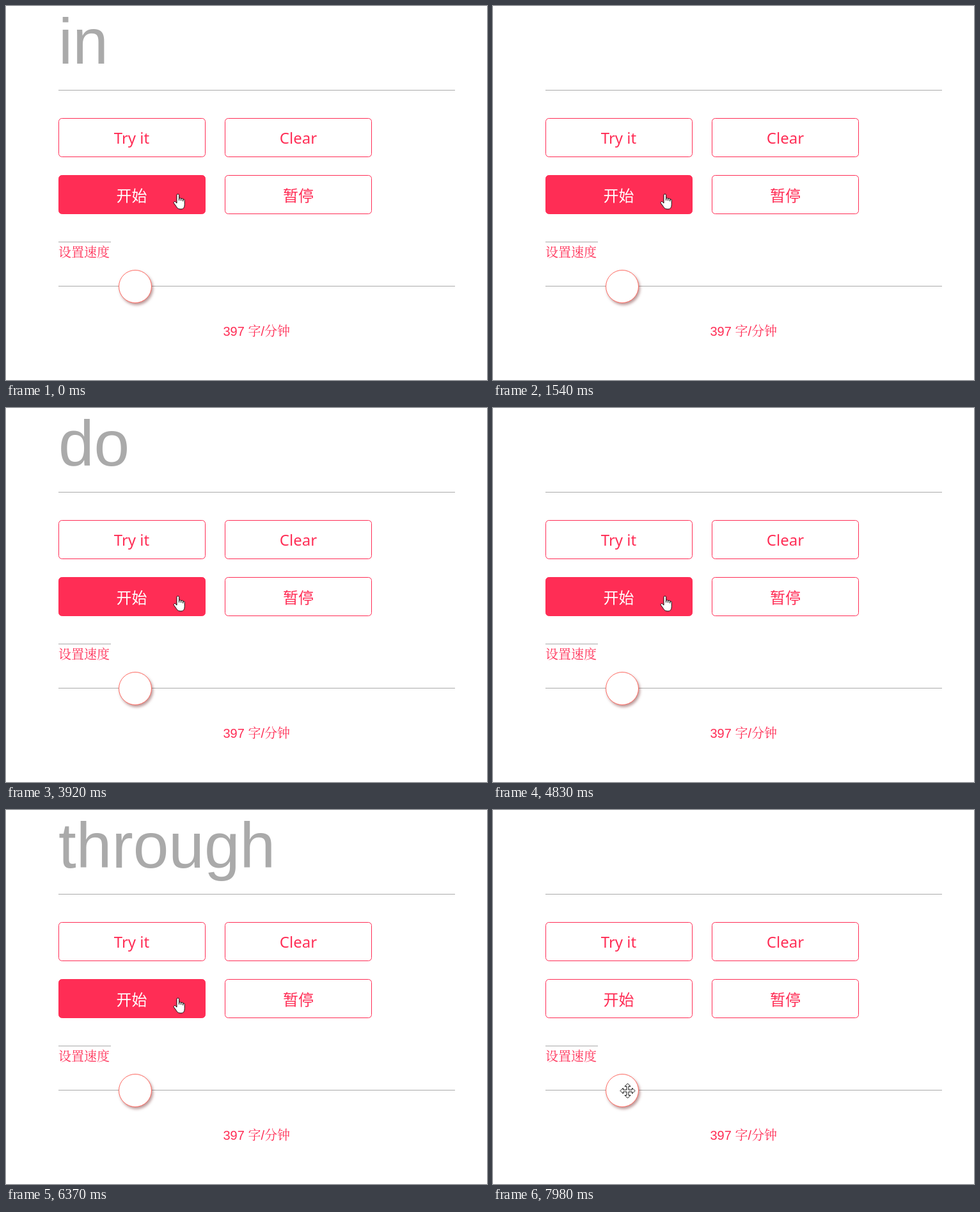
Write an HTML page that moves like this. It is 752 px wide and 584 px high and loops after 8 s.

```html
<!DOCTYPE html>
<html lang="zh">
<head>
<meta charset="utf-8">
<title>Speed reader</title>
<style>
html, body { margin: 0; width: 100%; height: 100%; overflow: hidden; background: #fff; }
svg { display: block; width: 752px; height: 584px; }
text { fill: #ff2d55; }
.rule { fill: #aaa; }
.box { fill: #fff; stroke: #ff2d55; }
.btn text { font: 24px "Noto Sans", "Noto Sans CJK SC", "Noto Sans CJK", sans-serif; text-anchor: middle; }
.btn .han { font-family: "Noto Sans CJK SC", "Noto Sans CJK", sans-serif; }
.hover .box { fill: #ff2d55; }
.hover text { fill: #fff; }
.small { font: 300 20px "Liberation Sans", Arial, "Noto Serif CJK SC", "Noto Sans CJK SC", "Noto Sans CJK", sans-serif; }
#word { font: 100px "Liberation Sans", Arial, sans-serif; fill: #aaa; }
.knob { fill: #fff; stroke: #ff6a62; filter: drop-shadow(2px 3px 2px rgba(120, 50, 50, .5)); }
#cursor path { fill: #fff; stroke: #111; stroke-linejoin: round; }
</style>
</head>
<body>
<svg viewBox="0 0 752 584">
  <defs>
    <linearGradient id="tint" gradientUnits="userSpaceOnUse" x1="0" y1="82" x2="0" y2="94">
      <stop offset="0" stop-color="#aaa"/>
      <stop offset="1" stop-color="#b0c6ae"/>
    </linearGradient>
  </defs>
  <text id="word" x="82" y="90"></text>
  <rect class="rule" x="82" y="131" width="620" height="1"/>

  <g class="btn">
    <rect class="box" x="82.5" y="175.5" width="229" height="60" rx="5"/>
    <text x="196.5" y="215">Try it</text>
  </g>
  <g class="btn">
    <rect class="box" x="342.5" y="175.5" width="229" height="60" rx="5"/>
    <text x="457" y="215">Clear</text>
  </g>
  <g class="btn" id="start">
    <rect class="box" x="82.5" y="264.5" width="229" height="60" rx="5"/>
    <text class="han" x="196.5" y="305">开始</text>
  </g>
  <g class="btn">
    <rect class="box" x="342.5" y="264.5" width="229" height="60" rx="5"/>
    <text class="han" x="457" y="305">暂停</text>
  </g>

  <rect class="rule" x="82" y="368" width="82" height="1"/>
  <text class="small" x="82" y="392">设置速度</text>
  <rect class="rule" x="82" y="437" width="620" height="1"/>
  <circle class="knob" cx="202" cy="438" r="25.5"/>
  <text class="small" x="339.5" y="515">397 字/分钟</text>

  <g id="cursor">
    <path id="hand" d="M-1.5 14V2a1.8 1.8 0 0 1 3.6 0V10V7.4a1.6 1.6 0 0 1 3 0V10.4V8.4a1.5 1.5 0 0 1 3 0V11.4V9.6a1.3 1.3 0 0 1 2.6 0V16C10.7 20 9.5 23.6 5.5 23.6H3.5C0 23.6-1.5 21-3 18.5L-6 14.5C-7 12.8-4.8 11-3.4 12.4L-1.5 14.5Z"/>
    <path id="arrow" d="M0 0V16.5L3.8 12.8L6.4 18.8L9 17.7L6.4 11.8H11.7Z"/>
    <path id="move" d="M0-11.5L4.5-7H1.5V-1.5H7V-4.5L11.5 0L7 4.5V1.5H1.5V7H4.5L0 11.5L-4.5 7H-1.5V1.5H-7V4.5L-11.5 0L-7-4.5V-1.5H-1.5V-7H-4.5Z"/>
  </g>
</svg>
<script>
const LOOP = 8000, TICK = 70, MOVE_AT = 7210;

// [word, shown at, hidden at]
const words = [
  ['in', 0, 70], ['the', 280, 420], ['world', 630, 770], ['is', 980, 1190],
  ['that', 1400, 1540], ['over', 1750, 1890], ['if', 2100, 2310],
  ['out', 2520, 2660], ['of', 2870, 3010], ['how', 3220, 3360],
  ['if', 3570, 3710], ['do', 3920, 4130], ['not', 4340, 4480],
  ['let', 4690, 4830], ['be', 5040, 5250], ['yourself', 5460, 5600],
  [',', 5600, 5810], ['go', 5950, 6160], ['through', 6300, 6510],
  ['without', 6720, 6860], ['a', 7070, 7280], ['soft', 7420, 7630],
  ['stormy', 7770, 7980]
];

const rest = [268, 293];
const path = [
  [272, 310], [268, 340], [258, 375], [245, 402], [232, 422], [222, 434],
  [215, 441], [212, 442], [211, 440], [211, 439], [210, 439], [210, 438]
];

const el = id => document.getElementById(id);
const word = el('word'), start = el('start'), cursor = el('cursor');
const shapes = ['hand', 'arrow', 'move'].map(el);

function shapeAt(x, y) {
  if (y < 325) return 'hand';
  return Math.hypot(x - 202, y - 438) < 26 ? 'move' : 'arrow';
}

function draw(t) {
  const now = words.find(w => t >= w[1] && t < w[2]);
  const text = now ? now[0] : '';
  if (word.textContent !== text) word.textContent = text;
  word.style.fill = text === ',' ? 'url(#tint)' : '';

  const step = Math.floor((t - MOVE_AT) / TICK);
  const [x, y] = step < 0 ? rest : path[Math.min(step, path.length - 1)];
  const shape = shapeAt(x, y);
  cursor.setAttribute('transform', `translate(${x + .5} ${y + .5})`);
  for (const s of shapes) s.style.display = s.id === shape ? '' : 'none';
  start.classList.toggle('hover', shape === 'hand');
}

const t0 = performance.now();
function frame() {
  draw((performance.now() - t0) % LOOP);
  requestAnimationFrame(frame);
}
frame();
</script>
</body>
</html>
```
